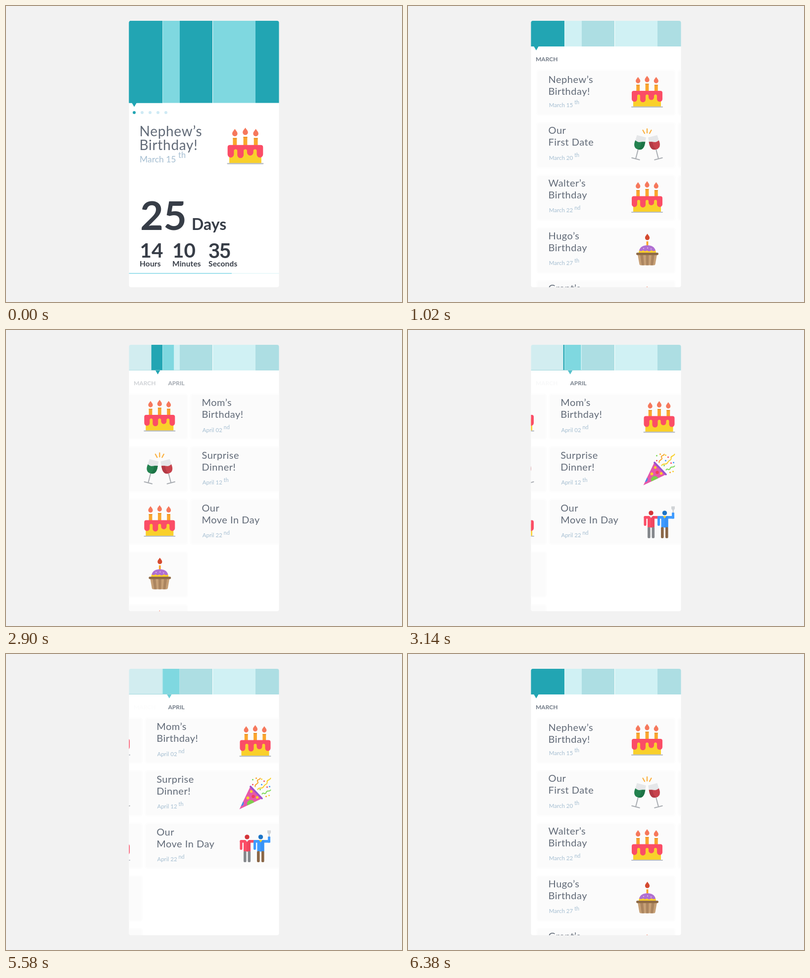
Animation of 800 by 600 pixels, one loop 8 s. Source, as an HTML page:

```html
<!DOCTYPE html>
<html lang="en">
<head>
<meta charset="utf-8">
<title>Event countdown</title>
<style>
  html, body { margin: 0; width: 100%; height: 100%; overflow: hidden; background: #f2f2f2; }
  svg { display: block; font-family: Lato, sans-serif; }
  .title { font-size: 20px; letter-spacing: .5px; fill: #626b78; }
  .date { font-size: 11.5px; fill: #a6bfd2; }
  .month { font-size: 12px; font-weight: 700; fill: #717a86; }
  #countdown { font-weight: 700; fill: #373d47; }
  .unit { font-size: 15.5px; letter-spacing: .15px; }
  .card { fill: #fbfbfb; stroke: #fdfdfd; stroke-width: 3; }
</style>
</head>
<body>
<svg id="stage" width="800" height="600" viewBox="0 0 800 600"></svg>
<script>
const TEAL = [34, 165, 179], AQUA = [127, 216, 224];
const rgb = c => `rgb(${c.map(Math.round)})`;
const lerp = (a, b, p) => a + (b - a) * p;

// Shape helpers
const rect = (x, y, w, h, fill, r = 0, more = '') =>
  `<rect x="${x}" y="${y}" width="${w}" height="${h}" rx="${r}" fill="${fill}" ${more}/>`;
const dot = (x, y, r, fill, more = '') => `<circle cx="${x}" cy="${y}" r="${r}" fill="${fill}" ${more}/>`;
const path = (d, fill) => `<path d="${d}" fill="${fill}"/>`;
const line = (d, color, w) =>
  `<path d="${d}" fill="none" stroke="${color}" stroke-width="${w}" stroke-linecap="round"/>`;
const text = (x, y, str, more = '') => `<text x="${x}" y="${y}" ${more}>${str}</text>`;
const flame = (x, y, fill) =>
  path(`M${x} ${y}c1.5 3 4.6 5 4.6 8.4a4.6 4.6 0 0 1-9.2 0c0-3.4 3.1-5.4 4.6-8.4z`, fill);

// Icons on a 64 unit square
const candle = (x, y) =>
  flame(x, y, '#f6785c') + rect(x - 3.4, y + 16, 6.8, 16, '#fba62c') + rect(x - 3.4, y + 16, 6.8, 2, '#e8942b');

const cake = candle(13.7, 2.2) + candle(32, 0) + candle(50.3, 2.2) +
  rect(4, 38, 56, 24.5, '#f9d02b') + rect(0, 62, 64, 2.2, '#b9bec5', 1) +
  path('M1 34.5q0-4 4-4H59q4 0 4 4V47a5.5 5.5 0 0 1-11 0V41a3 3 0 0 0-6 0V43.5a5.5 5.5 0 0 1-11 0V41' +
       'a3 3 0 0 0-6 0V48a5.5 5.5 0 0 1-11 0V41a3 3 0 0 0-6 0V47a5.5 5.5 0 0 1-11 0z', '#fb4d66');

const glass = (wine, shade) =>
  line('M-8 0H8M0 0V-22', '#a9adb2', 2) +
  path('M-9.5-47H9.5L10.5-31Q10-19.5 0-19.5T-10.5-31z', '#e5e7e9') +
  path('M-10.2-36Q-4-33 0-35T10.2-38L10.5-31Q10-19.5 0-19.5T-10.5-31z', wine) +
  path('M3-36L10.2-38L10.5-31Q10-19.5 0-19.5Q5-26 3-36z', shade);
const toast = line('M32 1V9M23.5 3.5L27 10M40.5 3.5L37 10', '#fbb040', 2.2) +
  `<g transform="translate(9 61.5) rotate(14.5)">${glass('#23824f', '#1d7346')}</g>` +
  `<g transform="translate(55 61.5) scale(-1 1) rotate(14.5)">${glass('#c8434d', '#b23a45')}</g>`;

const cupcake = flame(32.5, 0, '#d4492f') + rect(30.6, 15.5, 3.8, 10, '#f9a52b') +
  path('M15 39Q15 31 22 29H43Q50 31 50 39z', '#fbcf2b') +
  path('M16 34Q19 23.5 32.5 23.5T49 34Q45 37 41 33.5Q36 38 32 34Q27 37 24 33.5Q20 37 16 34z', '#b070d2') +
  dot(25, 30, 1, '#f0d4f8') + dot(33, 29, 1, '#f0d4f8') + dot(40, 31, 1, '#f0d4f8') +
  path('M13 42H52L48.5 62Q48 64 46 64H19Q17 64 16.5 62z', '#c7a076') +
  path('M18 42h6l2 22h-5zM29.5 42h6l-.5 22h-5zM41 42h6l-3 22h-5z', '#ab8560') +
  rect(10, 38.5, 45, 4.8, '#8f6b47', 2.4);

const confetti = [[27, 14, '#f7485e'], [50, 7, '#f7485e'], [45, 14, '#3f9bff'], [56, 19, '#f7485e'], [27, 4, '#7ed957'],
  [34, 1, '#f9a52b'], [61, 18, '#3f9bff'], [54, 38, '#f9a52b'], [60, 36, '#f9d02b'], [42, 24, '#7ed957'], [45, 3, '#f9d02b']];
const popper = path('M0 64L22 18L46 42z', '#e658a9') +
  path('M7.6 48a6 6 0 0 1-4.3 9.500z', '#3f8ff0') + path('M16 56.4a7.5 7.5 0 0 1 14-6.7z', '#7ccf4b') +
  dot(17, 41, 3, '#f9d02b') + dot(28, 38, 3.2, '#f23f5a') + dot(24, 28, 2.6, '#f9d02b') + dot(36, 40, 2.6, '#f9d02b') +
  line('M22.5 18L45.5 42', '#9c50cf', 3.6) +
  line('M32 18C30 12 40 13 37 8S42 5 42 1', '#f9a52b', 2) +
  line('M37 24C40 17 46 25 49 18S57 15 56 9S62 6 63 1', '#f9d02b', 2) +
  line('M46 33C48 28 52 36 54 30S60 30 63 25', '#7ed957', 2) +
  confetti.map(([x, y, c]) => dot(x, y, 1.5, c)).join('');

const friends = dot(15.5, 13.5, 4.7, '#d43338') + rect(1, 19.5, 30, 5.5, '#fb4d66', 2.7) + rect(1, 19.5, 5, 20, '#fb4d66', 2.5) +
  rect(8.5, 20, 14, 23, '#fb4d66') + rect(15.5, 20, 7, 23, '#f0465f') + path('M12 19.5h7l-3.5 4z', '#e8eaec') +
  rect(8.5, 42, 5.6, 22.5, '#85888c', 2) + rect(17, 42, 5.6, 22.5, '#85888c', 2) +
  dot(43, 13.5, 4.7, '#1c74c6') + rect(28.5, 19.5, 34, 5.5, '#3f9bff', 2.7) + rect(28.5, 19.5, 5, 20, '#3f9bff', 2.5) +
  rect(57.5, 12.5, 5, 12.5, '#3f9bff', 1) + rect(36, 20, 14, 23, '#3f9bff') + rect(43, 20, 7, 23, '#3792f6') +
  path('M39.5 19.5h7l-3.5 5z', '#f9d02b') +
  rect(35.5, 42, 5.6, 22.5, '#8a6747', 2) + rect(44.5, 42, 5.6, 22.5, '#8a6747', 2) +
  rect(59.3, 6, 1.6, 7, '#b9bdc2') + path('M56.5 0H63.5V4Q63 7.5 60 7.5T56.5 4z', '#d0d3d6');

// Month pages
const ROW = 106.7;
const at = (x, y, s = 1) => `translate(${x} ${y}) scale(${s})`;

function event(page, i, [icon, first, second, date, suffix]) {
  const y = i * ROW;
  return `<g class="event">${rect(page.card, 130 + y, 279, 91, '', 5, 'class="card"')}
    <g class="title" transform="${at(page.text, page.base + y)}">${text(0, 0, first)}${text(0, 24, second)}</g>
    <g class="date" transform="${at(page.text + 1.2, page.base + 52.4 + y)}"><text>${date}<tspan
      dx="3" dy="-5.5" font-size="10.8">${suffix}</tspan></text></g>
    <g class="icon" transform="${at(page.icon, page.iconY + y)}">${icon}</g></g>`;
}

const march = { card: 260.5, text: 283.6, base: 152.5, icon: 451, iconY: 141.5 };
const april = { card: 545.5, text: 568.2, base: 154.3, icon: 735.5, iconY: 144 };
const marchEvents = [
  [cake, 'Nephew’s', 'Birthday!', 'March 15', 'th'],
  [toast, 'Our', 'First Date', 'March 20', 'th'],
  [cake, 'Walter’s', 'Birthday', 'March 22', 'nd'],
  [cupcake, 'Hugo’s', 'Birthday', 'March 27', 'th'],
  [cake, 'Grant’s', 'Birthday', 'March 29', 'th']
].map((e, i) => event(march, i, e));
const aprilEvents = [
  [cake, 'Mom’s', 'Birthday!', 'April 02', 'nd'],
  [popper, 'Surprise', 'Dinner!', 'April 12', 'th'],
  [friends, 'Our', 'Move In Day', 'April 22', 'nd']
].map((e, i) => event(april, i, e));

const stripes = [[248, 68], [316.5, 34.5], [351, 66], [418, 86], [504, 48]]
  .map(([x, w], i) => rect(x, 0, w, 52, rgb(i % 2 ? AQUA : TEAL))).join('');
const cloud = (x, y, r) => dot(x, y, r, '#e3f5f8', 'stroke="#f3fbfc" stroke-width="1.5"');

const stage = document.getElementById('stage');
stage.innerHTML = `
  <clipPath id="phone">${rect(248.5, 30, 303, 540, '', 4)}</clipPath>
  <clipPath id="window"><rect id="pane" y="0" height="600"/></clipPath>
  <g clip-path="url(#phone)">
    ${rect(248, 30, 304, 540, '#fff')}
    <g id="countdown">
      ${text(271, 454, '25', 'font-size="81"')}${text(375, 454, 'Days', 'font-size="32"')}
      ${text(270.5, 510, '14', 'font-size="40.5"')}${text(336, 510, '10', 'font-size="40.5"')}
      ${text(409, 510.5, '35', 'font-size="42" font-family="Roboto, sans-serif" font-weight="500" letter-spacing="-2.5"')}
      <g class="unit">${text(270, 528, 'Hours')}${text(336, 528, 'Minutes')}${text(409, 528, 'Seconds')}</g>
      ${rect(248, 541.5, 304, 1, '#d8f4f6')}${rect(248, 541.2, 208, 1.6, '#8edbe9')}
    </g>
    <g id="list">
      ${marchEvents[0]}
      <g id="rest">${marchEvents.slice(1).join('')}</g>
      <g id="april">${aprilEvents.join('')}</g>
    </g>
    <g id="clouds">${cloud(273, 550, 66)}${cloud(392, 579, 110)}${cloud(511, 583, 81)}</g>
    <g id="dots">${[0, 1, 2, 3, 4].map(i => dot(259 + 16 * i, 216, 3, i ? '#cfeaf5' : rgb(TEAL))).join('')}</g>
    <g class="month" id="months">${text(258, 111.5, 'MARCH', 'id="m3"')}${text(327.5, 111.5, 'APRIL', 'id="m4"')}</g>
    <path id="marker" d="M-5-.5H5L0 8z"/>
    <g class="stripes" id="faded">${stripes}</g>
    <g clip-path="url(#window)"><g class="stripes">${stripes}</g></g>
    ${rect(248, 81, 103, 1, '#a0d8dc', 0, 'id="rule"')}
  </g>`;

const $ = s => stage.querySelector(s);
const set = (node, attrs) => { for (const k in attrs) node.setAttribute(k, attrs[k]); };
const [list, rest, aprilPage, clouds, dots, months, m3, m4, marker, faded, countdown, pane, rule] =
  ['list', 'rest', 'april', 'clouds', 'dots', 'months', 'm3', 'm4', 'marker', 'faded', 'countdown', 'pane', 'rule']
    .map(id => $('#' + id));
const hero = { card: $('.card'), title: $('.title'), second: $('.title').lastChild, date: $('.date'), icon: $('.icon') };

// The CSS "ease" curve, solved by bisection
function ease(x) {
  if (x <= 0) return 0;
  if (x >= 1) return 1;
  let a = 0, b = 1;
  for (let i = 0; i < 24; i++) {
    const m = (a + b) / 2;
    if (.75 * m * (1 - m) + m ** 3 < x) a = m; else b = m;
  }
  return .3 * a * (1 - a) ** 2 + 3 * a * a * (1 - a) + a ** 3;
}
const tween = (t, start, length) => ease((t - start) / length);

function draw(t) {
  const open = tween(t, 465, 550);
  const page = tween(t, 2626, 770) - (t > 5560 ? tween(t, 5522, 770) : 0);
  const head = tween(t, 2630, 700) - tween(t, 5560, 700);
  const rise = t < 5560 ? tween(t, 3150, 310) : 0;
  const height = lerp(166.5, 52, open);
  const move = (x0, x1, y0, y1, s) => ({ transform: at(lerp(x0, x1, open), lerp(y0, y1, open), lerp(s, 1, open)) });

  for (const s of stage.querySelectorAll('.stripes')) set(s, { transform: `translate(0 30) scale(1 ${height / 52})` });
  [...faded.children].forEach((s, i) => set(s, { opacity: lerp(1, i ? .37 : .2, open) }));
  const left = lerp(248, 317, head);
  set(pane, { x: left, width: lerp(316, 351, head) - left });
  set(rule, { opacity: head });
  // The marker changes colour late in its slide
  set(marker, {
    transform: at(lerp(259, 331, head), 30 + height),
    fill: rgb(TEAL.map((c, i) => lerp(c, AQUA[i], head ** 12)))
  });

  set(hero.card, { opacity: open, transform: at(0, 105 * (1 - open)) });
  set(hero.title, move(269.5, march.text, 264, 156, 1.4));
  set(hero.second, { y: lerp(20, 24, open) });
  set(hero.date, move(270, 284.8, 316.5, 204.9, 1.52));
  set(hero.icon, move(446.5, march.icon, 246.5, march.iconY, 1.156));

  set(countdown, { opacity: Math.max(0, 1 - 2.5 * open) });
  set(dots, { opacity: 1 - open, transform: at(0, height - 166.5) });
  set(months, { opacity: open, transform: at(0, height - 52) });
  set(m3, { opacity: 1 - head });
  set(m4, { opacity: head });
  set(rest, { transform: at(0, 340 * (1 - open)) });
  set(aprilPage, { opacity: open });
  set(list, { transform: at(-281 * page, 0) });
  set(clouds, { transform: at(0, 105 * (1 - rise)) });
}

// 25 pictures a second, 8 second loop
const begin = performance.now();
function tick() {
  const t = (performance.now() - begin) % 8000;
  draw(Math.floor((t - 20) / 40) * 40 + 20);
  requestAnimationFrame(tick);
}
tick();
</script>
</body>
</html>
```
